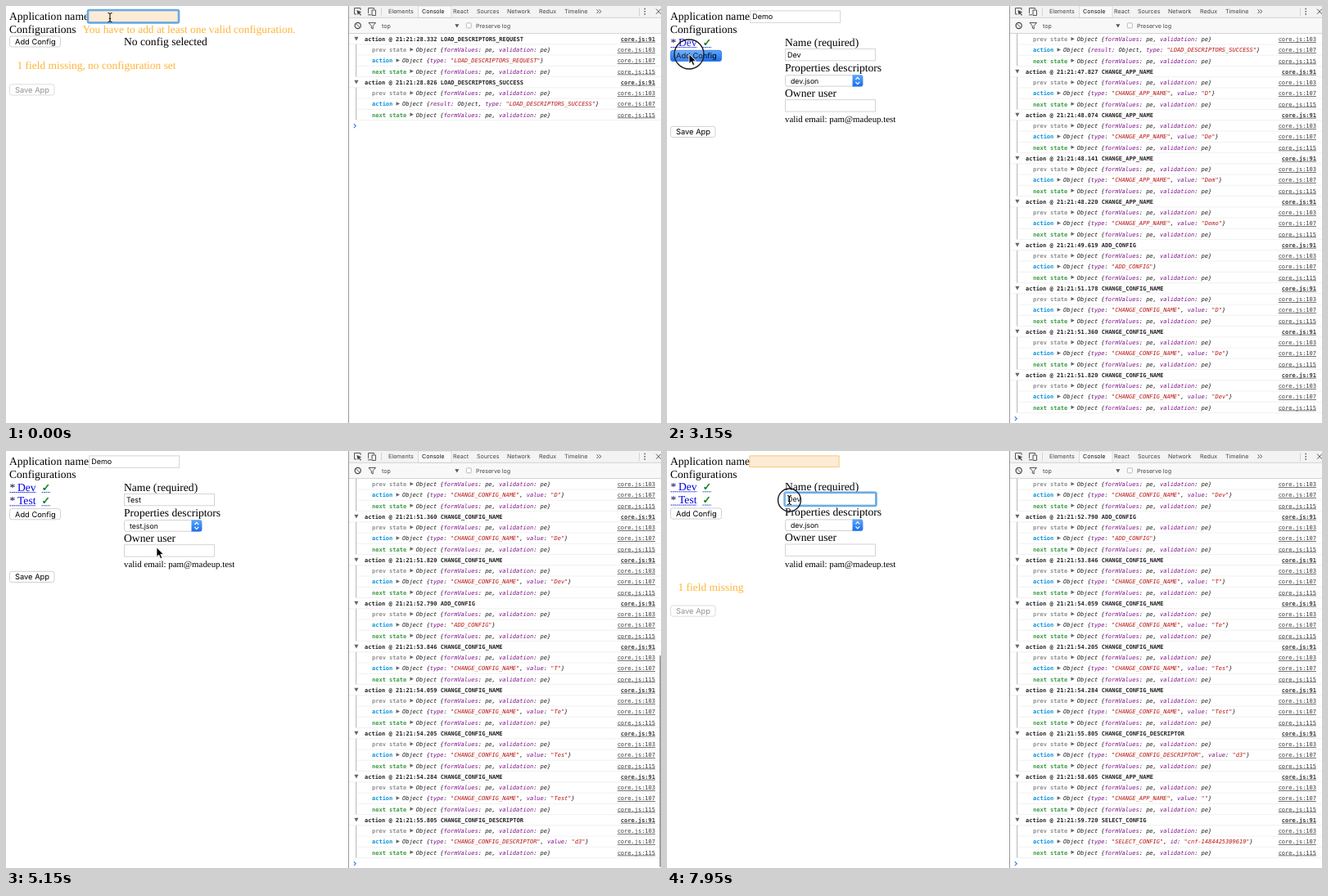
Animation, 800 px wide and 510 px high, one loop 8000 ms. Source, as an HTML page:

```html
<!DOCTYPE html>
<html lang="en">
<head>
<meta charset="utf-8">
<title>Config form with console</title>
<style>
html, body { margin: 0; width: 100%; height: 100%; overflow: hidden; background: #fff; }
svg { display: block; width: 800px; height: 510px; text-rendering: geometricPrecision; }
.serif { font: 13.6px "Liberation Serif", serif; }
.small { font: 10.88px "Liberation Serif", serif; }
.ui { font: 9.3px Inter, sans-serif; }
.input { font: 9px Inter, sans-serif; }
.select { font: 8.7px Inter, sans-serif; }
.tab { font: 7.1px Inter, sans-serif; fill: #444; }
.mono { font: italic 7px "DejaVu Sans Mono", monospace; fill: #1c1c1c; }
.bold { font: bold 7px "DejaVu Sans Mono", monospace; fill: #222; }
.ref { font: 7px "DejaVu Sans Mono", monospace; fill: #3a3a3a; text-decoration: underline; text-anchor: end; }
.ref.head { font-weight: bold; }
.key { fill: #7d0f88; }
.str { fill: #b81410; }
.warn { fill: #ffb439; font-size: 13.45px; }
.link { fill: #0000e0; }
.tick { font: 12.5px "DejaVu Sans", sans-serif; fill: #0a7d18; stroke: #0a7d18; stroke-width: .5; }
</style>
</head>
<body>
<svg viewBox="0 0 800 510" xmlns="http://www.w3.org/2000/svg">
  <defs>
    <linearGradient id="blue" x2="0" y2="1"><stop stop-color="#5aa8fb"/><stop offset="1" stop-color="#1a6df0"/></linearGradient>
    <clipPath id="logClip"><rect x="419" y="34" width="381" height="476"/></clipPath>
    <filter id="shadow" x="-20%" y="-20%" width="140%" height="160%"><feDropShadow dx="0" dy="3" stdDeviation="4" flood-opacity=".3"/></filter>
  </defs>
  <rect width="800" height="510" fill="#fff"/>
  <g id="form"></g>
  <g clip-path="url(#logClip)"><g id="log"></g></g>
  <rect id="thumb" x="798.2" width="1.8" rx=".9" fill="#777"/>
  <g id="tools"></g>
  <circle id="ring" fill="#fff" fill-opacity=".12" stroke="#1c1c24" stroke-width="1.4"/>
  <g id="mouse">
    <g id="beam" fill="none" stroke="#000"><path d="M-2.5-5.5Q0-5.5 0-4Q0-5.5 2.5-5.5M0-4V4M-2.5 5.5Q0 5.5 0 4Q0 5.5 2.5 5.5M-1.2 1.5H1.2"/></g>
    <path id="arrow" d="M0 0V11.5L2.7 9L4.7 13.6L6.7 12.7L4.8 8.3H8.4Z" stroke="#fff" stroke-width=".8"/>
    <path id="hand" d="M-2.4-3.6Q-1.6-5-.6-3.6L1 .2Q2.6-.8 3.3.6Q4.7 0 5.2 1.4Q6.6 1.2 6.7 3L6.4 6.6L5.2 9.6H-.2L-4 4.4Q-3.6 2.6-1.4 4.2Z" fill="#fff" stroke="#111" stroke-width=".9"/>
  </g>
</svg>
<script>
const LOOP = 8000;
const ROW = 13.25, ENTRY = 53;
const $ = id => document.getElementById(id);
const text = (x, y, s, cls, extra = '') => `<text x="${x}" y="${y}" class="${cls}" ${extra}>${s}</text>`;
const rect = (x, y, w, h, extra) => `<rect x="${x}" y="${y}" width="${w}" height="${h}" ${extra}/>`;
const path = (d, extra) => `<path d="${d}" ${extra}/>`;

// seconds after 21:21, action type, payload key, payload value
const actions = [
  [28.332, 'LOAD_DESCRIPTORS_REQUEST'],
  [28.826, 'LOAD_DESCRIPTORS_SUCCESS', 'result'],
  [47.827, 'CHANGE_APP_NAME', 'value', 'D'],
  [48.074, 'CHANGE_APP_NAME', 'value', 'De'],
  [48.141, 'CHANGE_APP_NAME', 'value', 'Dem'],
  [48.220, 'CHANGE_APP_NAME', 'value', 'Demo'],
  [49.619, 'ADD_CONFIG'],
  [51.178, 'CHANGE_CONFIG_NAME', 'value', 'D'],
  [51.360, 'CHANGE_CONFIG_NAME', 'value', 'De'],
  [51.820, 'CHANGE_CONFIG_NAME', 'value', 'Dev'],
  [52.790, 'ADD_CONFIG'],
  [53.846, 'CHANGE_CONFIG_NAME', 'value', 'T'],
  [54.059, 'CHANGE_CONFIG_NAME', 'value', 'Te'],
  [54.205, 'CHANGE_CONFIG_NAME', 'value', 'Tes'],
  [54.284, 'CHANGE_CONFIG_NAME', 'value', 'Test'],
  [55.805, 'CHANGE_CONFIG_DESCRIPTOR', 'value', 'd3'],
  [58.605, 'CHANGE_APP_NAME', 'value', ''],
  [59.720, 'SELECT_CONFIG', 'id', 'cnf-1484425309619']
].map(([sec, type, key, value]) => ({ sec, type, key, value, at: 3200 + (sec - 52.79) * 619 }));

const focusSteps = [[0, 'app'], [1150, ''], [1850, 'name'], [3070, ''], [3680, 'name'], [4290, ''], [6060, 'app'], [7430, ''], [7930, 'name']];
const menuSteps = [[0, -1], [4300, 0], [4400, 1], [4750, 2], [5069, -1]];
const selectedSteps = [[0, 0], [1950, 1], [2200, 0], [3760, 1], [3854, 0], [6220, 1], [6799, 0]];
const clicks = [[1140, 1230], [1850, 1910], [1940, 1990], [3070, 3200], [3660, 3720], [4270, 4330], [5010, 5069], [6090, 6150], [6200, 6260], [7425, 7495], [7945, 8000]];
const mousePath = [
  [0, 127, 14], [520, 127, 14], [1080, 48, 46], [1380, 48, 46], [1830, 161, 62], [2680, 161, 62],
  [3050, 27, 59], [3260, 27, 59], [3640, 162, 62], [4130, 162, 62], [4270, 180, 91], [4430, 186, 104],
  [4650, 186, 106], [4900, 184, 118], [5200, 184, 118], [5950, 124.5, 15], [6880, 124.5, 15],
  [7380, 16, 45], [7580, 16, 45], [7900, 149.5, 60], [8000, 149.5, 60]
];
const items = ['dev.json', 'stage.json', 'test.json', 'production.json'];

const stepAt = (steps, t) => steps.filter(s => s[0] <= t).pop()[1];
const ruler = document.createElement('canvas').getContext('2d');
const widthOf = (s, font) => (ruler.font = font, ruler.measureText(s).width);

function mouseAt(t) {
  const i = Math.max(1, mousePath.findIndex(p => p[0] > t));
  const [t0, x0, y0] = mousePath[i - 1], [t1, x1, y1] = mousePath[i];
  const k = (t - t0) / (t1 - t0), e = k * k * (3 - 2 * k);
  return [x0 + (x1 - x0) * e, y0 + (y1 - y0) * e];
}

function reduce(s, { type, value }) {
  if (type === 'CHANGE_APP_NAME') s.app = value;
  if (type === 'ADD_CONFIG') s.current = s.configs.push({ name: `Untitled ${s.configs.length + 1}`, file: items[0] }) - 1;
  if (type === 'CHANGE_CONFIG_NAME') s.configs[s.current].name = value;
  if (type === 'CHANGE_CONFIG_DESCRIPTOR') s.configs[s.current].file = items[2];
  if (type === 'SELECT_CONFIG') s.current = 0;
  return s;
}

function button(y, w, label, { disabled, pressed } = {}) {
  const fill = pressed ? 'url(#blue)' : '#fff';
  const stroke = pressed ? '#2a6fd8' : disabled ? '#d4d4d4' : '#c6c6c6';
  return rect(4.5, y - 6.7, w, 13.2, `rx="2.6" fill="${fill}" stroke="${stroke}" stroke-width=".8"`) +
    text(11, y + 3.3, label, 'ui', disabled ? 'fill="#929292"' : '');
}

function field(x, y, value, { focused, invalid, selected } = {}) {
  // the invalid style has a thinner border, so its box is a little smaller
  const width = invalid ? 109.2 : 110, height = invalid ? 13.7 : 14.4;
  const box = (w, extra) => rect(x - w, y - w, width + 2 * w, height + 2 * w, extra);
  let out = focused ? box(.7, 'rx="1.5" fill="none" stroke="#62a8e6" stroke-width="3"') : '';
  out += box(0, `fill="${invalid ? '#fdebd6' : '#fff'}" stroke="${focused ? '#6fabe0' : invalid ? '#fbc06a' : '#cfcfcf'}" stroke-width=".9"`);
  if (selected) out += rect(x + 2, y + 1.7, widthOf(value, '9px Inter, sans-serif') + 1, 11, 'fill="#b3d5fd"');
  return out + text(x + 2.5, y + 10.5, value, 'input');
}

function configLink(name, y) {
  const end = 14 + widthOf(name, '13.6px "Liberation Serif", serif');
  const dots = 'fill="none" stroke-width="1" stroke-dasharray="1.7 .7"';
  return text(4.5, y + 4.6, '*', 'serif', 'fill="#000050"') + text(14, y + 4.6, name, 'serif link') +
    text(end + 7, y + 4.6, '✓', 'tick') +
    path(`M4.5 ${y + 6.5}H${end}`, dots + ' stroke="#2222e8"') +
    path(`M${end + 7} ${y + 6.5}h10.5`, dots + ' stroke="#2b4fc0"');
}

function selectBox(value) {
  return rect(144.5, 84.6, 94.5, 13.6, 'rx="2.6" fill="#fff" stroke="#c6c6c6" stroke-width=".8"') +
    path('M226.5 84.3H236.5Q239.3 84.3 239.3 87V96Q239.3 98.5 236.5 98.5H226.5Z', 'fill="url(#blue)"') +
    path('M230.4 90L232.8 87.4L235.2 90M230.4 93L232.8 95.6L235.2 93', 'fill="none" stroke="#fff" stroke-width="1.2"') +
    text(151, 94.5, value, 'select');
}

function popup(hover) {
  let out = rect(135.5, 80.6, 105.5, 60, 'rx="3.5" fill="#f6f6f6" stroke="#c2c2c2" stroke-width=".6" filter="url(#shadow)"');
  out += rect(135.5, 84 + 13.5 * hover, 105.5, 13.5, 'fill="#2f8cfb"');
  items.forEach((item, i) => {
    const fill = `fill="${i === hover ? '#fff' : '#111'}"`;
    out += text(153, 94 + 13.5 * i, item, 'ui', fill);
    if (!i) out += path('M141 91L143.3 94L147.4 87.5', `fill="none" stroke="${hover ? '#111' : '#fff'}" stroke-width="1.3"`);
  });
  return out;
}

function drawForm({ app, configs, current }, focus, menu, selected, pressed) {
  const count = configs.length, config = configs[current];
  const shift = count && !app ? -.7 : 0;
  let out = text(4, 17, 'Application name', 'serif') + text(4, 32.5, 'Configurations', 'serif');
  out += field(app ? 101.7 : 100.9, 5.9, app, { focused: focus === 'app', invalid: !app, selected: selected && focus === 'app' });
  let below = '';
  configs.forEach((c, i) => below += configLink(c.name, 44 + 16.3 * i));
  below += button(count ? 44.7 + 16.3 * count : 43.5, 62, 'Add Config', { pressed });
  if (config) {
    below += text(144, 48.6, 'Name (required)', 'serif') +
      field(144.5, 52.4, config.name, { focused: focus === 'name', selected: selected && focus === 'name' }) +
      text(144, 80, 'Properties descriptors', 'serif') + selectBox(config.file) +
      text(144, 111.2, 'Owner user', 'serif') + field(144.5, 114.7, '') +
      text(144, 142.3, 'valid email: pam@madeup.test', 'small');
  } else {
    out += text(93.5, 32.5, 'You have to add at least one valid configuration.', 'serif warn');
    below += text(144, 47.6, 'No config selected', 'serif');
  }
  out += `<g transform="translate(0 ${shift})">${below}</g>`;
  const problems = [!app && '1 field missing', !count && 'no configuration set'].filter(Boolean).join(', ');
  if (problems) out += text(13.5, count ? 170.5 : 77.3, problems, 'serif warn');
  out += button(!problems ? 154 : count ? 195.7 : 102.5, 54.5, 'Save App', { disabled: !!problems });
  return out + (menu < 0 ? '' : popup(menu));
}

function logEntry({ sec, type, key, value }, i) {
  const y = 40.2 + ENTRY * i;
  const pair = (k, v) => `<tspan class="key">${k}</tspan>: ${v}`;
  const quoted = s => `<tspan class="str">"${s}"</tspan>`;
  const pairs = [pair('type', quoted(type))];
  if (key === 'result') pairs.unshift(pair(key, 'Object'));
  else if (key) pairs.push(pair(key, quoted(value)));
  const state = [pair('formValues', 'pe'), pair('validation', 'pe')];
  const rows = [['prev state', '#8f8f8f', 103, state], ['action', '#0a93de', 107, pairs], ['next state', '#3a9c42', 115, state]];

  let out = path(`M425.3 ${y - 2.4}h5.2l-2.6 4.6z`, 'fill="#666"') +
    text(438, y + 2.6, `action @ 21:21:${sec.toFixed(3)} ${type}`, 'bold') + text(793, y + 2.6, 'core.js:91', 'ref head') +
    path(`M419 ${y + 6.6}H800`, 'stroke="#eee" stroke-width=".8"') +
    path(`M427.7 ${y + 6.6}v${ROW * 3}`, 'stroke="#aaa" stroke-width=".9"');
  rows.forEach(([label, color, line, list], j) => {
    const cy = y + ROW * (j + 1), x = 447 + label.length * 4.214;
    out += text(447, cy + 2.6, label, 'bold', `style="fill:${color}"`) +
      path(`M${x + 4.3} ${cy - 2.5}l4.4 2.3l-4.4 2.3z`, 'fill="#666"') +
      text(x + 11.7, cy + 2.6, `Object {${list.join(', ')}}`, 'mono') + text(793, cy + 2.6, `core.js:${line}`, 'ref') +
      path(`M428 ${cy + 6.6}H800`, 'stroke="#eee" stroke-width=".8"');
  });
  return out;
}

function drawLog(n) {
  const y = 40.3 + ENTRY * n;
  $('log').innerHTML = actions.slice(0, n).map(logEntry).join('') +
    path(`M424.8 ${y - 2}l2.5 2.4l-2.5 2.4`, 'fill="none" stroke="#4a86e0" stroke-width="1.2"');
  $('log').setAttribute('transform', `translate(0 ${n < 9 ? 0 : -13 - ENTRY * (n - 9)})`);
  const size = 476 * 476 / (26 + ENTRY * n);
  $('thumb').setAttribute('y', 509 - size);
  $('thumb').setAttribute('height', size);
}

function drawTools() {
  const line = 'fill="none" stroke="#555" stroke-width="1"';
  const tabs = [['Elements', 467], ['Console', 508], ['React', 546], ['Sources', 575], ['Network', 612], ['Redux', 651], ['Timeline', 682]];
  $('tools').innerHTML = rect(419, 0, 381, 14, 'fill="#f3f3f3"') + rect(419, 14, 381, 19.5, 'fill="#f8f8f8"') +
    rect(503.5, 0, 40.5, 14.3, 'fill="#fafafa" stroke="#d0d0d0" stroke-width=".7"') +
    path('M419 14.3H800M419 33.5H800M458.5 2V12M773.5 2V12', 'stroke="#ccc" stroke-width=".8"') +
    path('M418.5 0V510', 'stroke="#999" stroke-width="1"') +
    tabs.map(([label, x]) => text(x, 9.2, label, 'tab', label === 'Console' ? 'style="fill:#111"' : '')).join('') +
    path('M433 5V2.5H425.5V10H428M442.5 9V2.5H449.5V4M442 10.8H446M447 5h4.5v6.5h-4.5z', line) +
    path('M428.5 5L434.2 7.6L431.9 8.4L434 11L433 11.8L431 9.3L429.6 11Z', 'fill="#444"') +
    path('M721.5 4.3l2.2 2.4l-2.2 2.4M724.5 4.3l2.2 2.4l-2.2 2.4', line) +
    path('M779.5 2.8h1.5v1.5h-1.5zM779.5 6h1.5v1.5h-1.5zM779.5 9.2h1.5v1.5h-1.5z', 'fill="#555"') +
    path('M794 3.6L800 9.8M800 3.6L794 9.8', line) +
    '<circle cx="429.7" cy="24" r="3.6" fill="none" stroke="#444" stroke-width="1.2"/>' +
    path('M427.2 21.5L432.2 26.5', line) + path('M443 20.5H451.5L448.2 24.3V28L446.3 27V24.3Z', line) +
    text(459, 26.6, 'top', 'tab') + path('M548.3 22.2h5l-2.5 4.2z', 'fill="#555"') +
    rect(562.3, 20.8, 6, 6, 'rx="1" fill="#fff" stroke="#aaa" stroke-width=".8"') + text(574, 26.6, 'Preserve log', 'tab');
}

function pointerKind(x, y, { configs }, menu) {
  const inside = (l, t, r, b) => x >= l && x <= r && y >= t && y <= b;
  if (menu >= 0) return 'arrow';
  if (inside(101, 5, 212, 21) || (configs.length && inside(144, 52, 256, 68))) return 'beam';
  return configs.length && inside(4, 37, 60, 35 + 16.3 * configs.length) ? 'hand' : 'arrow';
}

let shownForm = '', shownCount = -1;
function render(t) {
  const done = actions.filter(a => a.at <= t);
  const state = done.reduce(reduce, { app: '', configs: [], current: -1 });
  const menu = stepAt(menuSteps, t);
  const click = clicks.find(([down, up]) => t >= down && t < up);
  const [x, y] = mouseAt(t);
  const pressed = !!click && (click[0] === 1140 || click[0] === 3070);
  const args = [state, stepAt(focusSteps, t), menu, stepAt(selectedSteps, t), pressed];
  const formKey = JSON.stringify(args);
  if (formKey !== shownForm) {
    $('form').innerHTML = drawForm(...args);
    shownForm = formKey;
  }
  if (done.length !== shownCount) drawLog(shownCount = done.length);
  const age = t - done[done.length - 1].at;
  $('thumb').setAttribute('opacity', done.length < 9 ? 0 : .75 * Math.min(1, Math.max(0, (450 - age) / 100)));

  const kind = pointerKind(x, y, state, menu);
  for (const id of ['beam', 'arrow', 'hand']) $(id).style.display = id === kind ? '' : 'none';
  $('mouse').setAttribute('transform', `translate(${x} ${y})`);
  $('ring').style.display = click ? '' : 'none';
  if (click) {
    $('ring').setAttribute('cx', x);
    $('ring').setAttribute('cy', y);
    $('ring').setAttribute('r', 13.6 + 4.4 * Math.min(1, (t - click[0]) / 80));
  }
}

drawTools();
const start = performance.now();
function tick() {
  render((performance.now() - start) % LOOP);
  requestAnimationFrame(tick);
}
tick();
</script>
</body>
</html>
```
